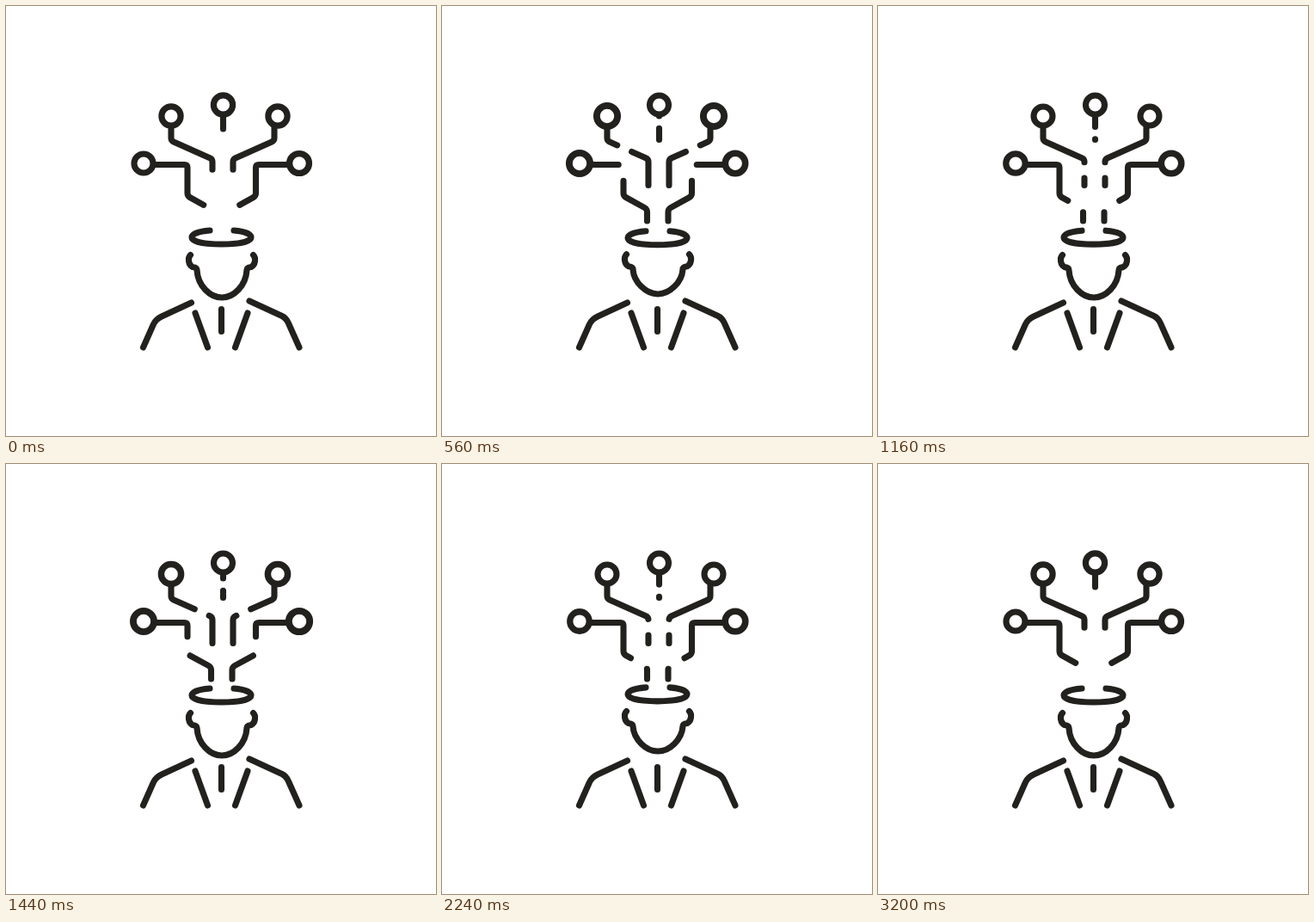
Animation, 500 px wide and 500 px high, one loop 3.24 s. Source, as an HTML page:

```html
<!DOCTYPE html>
<html lang="en">
<head>
<meta charset="utf-8">
<title>Connected mind</title>
<style>
  html, body { margin: 0; width: 100%; height: 100%; overflow: hidden; background: #fff; }
  svg { display: block; width: 100vw; height: 100vh; }
</style>
</head>
<body>
<svg viewBox="0 0 500 500" fill="none" stroke="#22211e" stroke-width="7.1" stroke-linecap="round" stroke-linejoin="round">
  <path d="M215.5 345L181 361Q174.500 364 171.500 370L159.500 397"/>
  <path d="M283 343L321 360.500Q326 363 328.500 369L341 397"/>
  <path d="M220 357L234.500 397M281 357L266.500 397M250.500 352.500V378.500"/>
  <path id="face"/>
  <path id="rim" d="M237 261C224 262 216 265 216 269C216 274 231 277 250.500 277S285 274 285 269C285 265 277 262 265 261"/>
  <g id="wires"></g>
  <g id="nodes"></g>
</svg>
<script>
const LOOP = 3240, STEP = 40, FLOW = 3200 / 3, HOP = 1600;
const byId = id => document.getElementById(id);

function add(parent, tag, attrs) {
  const el = document.createElementNS('http://www.w3.org/2000/svg', tag);
  for (const name in attrs) el.setAttribute(name, attrs[name]);
  return byId(parent).appendChild(el);
}

// Each wire has one gap that travels from the head to its node.
function wire(d, gapStart, gap, mirror) {
  const attrs = mirror ? { d, transform: `translate(${mirror} 0) scale(-1 1)` } : { d };
  const el = add('wires', 'path', attrs);
  const length = el.getTotalLength();
  el.setAttribute('stroke-dasharray', `${(1 - gap) * length} ${gap * length}`);
  return { el, length, gapEnd: gapStart + gap };
}

const outer = 'M173 184.500H207.500Q211 184.500 211 188V217.500Q211 221 214 222.700L235.500 234.500Q238.500 236.200 238.500 239.500V250';
const upper = 'M192 141V153.500Q192 156.500 195 158L237 176.700Q240 178 240 181.500V208.500';
const wires = [
  wire(outer, 0.8, 0.198),
  wire(outer, 0.8, 0.198, 501.5),
  wire(upper, 0.81, 0.19),
  wire(upper, 0.81, 0.19, 504),
  wire('M252.500 127V155.500', 0.56, 0.5)
];

const node = (x, y, peak, width) => ({
  el: add('nodes', 'circle', { r: 11 }), x, y, peak, width
});
const nodes = [
  node(160, 183, 0.45, 1),
  node(341, 183, 0.3, 1),
  node(192, 128, 0.6, 1),
  node(316, 128, 0.6, 1),
  node(252.5, 115, 0.8, 0.5)
];

function pulse(phase, peak, width) {
  const away = Math.abs(phase - peak);
  const distance = Math.min(away, 1 - away);
  return distance > width / 2 ? 0 : (1 + Math.cos(2 * Math.PI * distance / width)) / 2;
}

// Time, then vertical shifts of rim, ears and chin.
const poses = [
  [0, 0, 0, 0],
  [300, 22, 12.3, 6],
  [620, -1.2, -2, -5],
  [920, 3.5, 2.5, 0],
  [1200, 0, 0, 0],
  [HOP, 0, 0, 0]
];

function poseAt(t) {
  const i = poses.findIndex(pose => pose[0] > t);
  const from = poses[i - 1], to = poses[i];
  const k = (1 - Math.cos(Math.PI * (t - from[0]) / (to[0] - from[0]))) / 2;
  return from.slice(1).map((v, j) => v + (to[j + 1] - v) * k);
}

function drawHead(t) {
  const [rim, ear, chin] = poseAt(t % HOP);
  const e = y => y + ear, c = y => y + chin;
  byId('face').setAttribute('d',
    `M214.5 ${e(289.5)}C211 ${e(293)} 212 ${e(301)} 217 ${e(303.5)}Q222 ${e(304)} 222 ${e(307)}` +
    `C223 ${c(325)} 237 ${c(339)} 251 ${c(339)}` +
    `C265 ${c(339)} 279 ${c(325)} 280 ${e(307)}` +
    `Q280 ${e(304)} 285 ${e(303.5)}C290 ${e(301)} 291 ${e(293)} 287.5 ${e(289.5)}`);
  byId('rim').setAttribute('transform', `translate(0 ${rim})`);
}

function draw(t) {
  const phase = t / FLOW % 1;
  for (const { el, length, gapEnd } of wires) {
    el.setAttribute('stroke-dashoffset', (3 + phase - gapEnd) * length);
  }
  for (const { el, x, y, peak, width } of nodes) {
    const scale = 1 + 0.11 * pulse(phase, peak, width);
    el.setAttribute('transform', `translate(${x} ${y}) scale(${scale})`);
  }
  drawHead(t);
}

const start = performance.now();
function tick() {
  const t = (performance.now() - start) % LOOP;
  draw(Math.floor(t / STEP) * STEP);
  requestAnimationFrame(tick);
}
tick();
</script>
</body>
</html>
```
